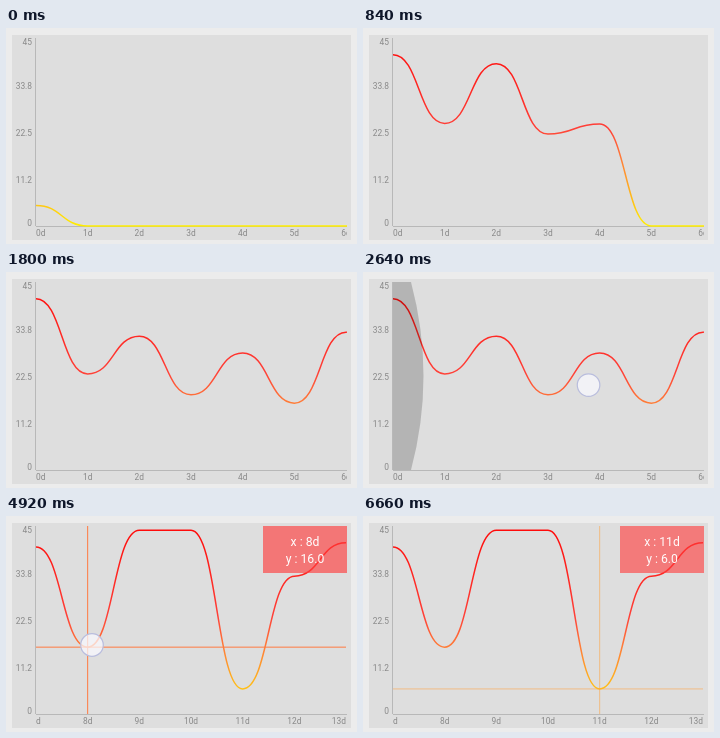
Animation of 351 by 216 pixels, one loop 6.72 s. Source, as an HTML page with a canvas:

```html
<!DOCTYPE html>
<html lang="en">
<head>
<meta charset="utf-8">
<title>Line chart</title>
<style>
  html, body { margin: 0; width: 100%; height: 100%; overflow: hidden; background: #ececec; }
  canvas { display: block; width: 351px; height: 216px; }
</style>
</head>
<body>
<canvas id="chart"></canvas>
<script>
const W = 351, H = 216, LOOP = 6720, STEP = 60;
const L = 30, R = 340, T = 10, B = 198;
const DAY = (R - L) / 6;
const values = [41, 23, 32, 18, 28, 16, 33, 40, 16, 44, 44, 6, 33, 41];
const LAST = values.length - 1;
const END = (LAST - 6) * DAY;

const canvas = document.getElementById('chart');
const ctx = canvas.getContext('2d');
const dpr = window.devicePixelRatio || 1;
canvas.width = W * dpr;
canvas.height = H * dpr;

const heat = ctx.createLinearGradient(0, T, 0, B);
[[0, '#ff0808'], [0.48, '#ff4038'], [0.65, '#ff7f38'], [0.86, '#ffbe18'], [1, '#ffee00']]
  .forEach(([at, color]) => heat.addColorStop(at, color));

const clamp = v => Math.min(1, Math.max(0, v));
const ramp = (t, a, b) => clamp((t - a) / (b - a));
const mix = (a, b, k) => a + (b - a) * k;
const smooth = k => k * k * (3 - 2 * k);
const yOf = v => B - v * (B - T) / 45;

// Overshoot easing with tension 3
function overshoot(p) {
  const s = clamp(p) - 1;
  return 4 * s * s * s + 3 * s * s + 1;
}

function valueAt(i, t) {
  return t >= 1800 ? values[i] : values[i] * overshoot((t + 17 - i * 173) / 825);
}

function scrollAt(t) {
  const k = ramp(t, 3080, 3410);
  return END * smooth(k);
}

function clipped(x, y, w, h, draw) {
  ctx.save();
  ctx.beginPath();
  ctx.rect(x, y, w, h);
  ctx.clip();
  draw();
  ctx.restore();
}

function segment(x0, y0, x1, y1) {
  ctx.beginPath();
  ctx.moveTo(x0, y0);
  ctx.lineTo(x1, y1);
  ctx.stroke();
}

function text(str, x, y, align) {
  ctx.textAlign = align;
  ctx.fillText(str, x, y);
}

function drawFrame() {
  ctx.fillStyle = '#ececec';
  ctx.fillRect(0, 0, W, H);
  ctx.fillStyle = '#dedede';
  ctx.fillRect(6, 7, 339, 205);
  ctx.strokeStyle = '#b8b8b8';
  ctx.lineWidth = 1;
  segment(L - 0.5, T, L - 0.5, B);
  segment(L, B + 0.5, R + 1, B + 0.5);
}

function drawLabels(scroll) {
  ctx.font = '8.4px Roboto, sans-serif';
  ctx.fillStyle = '#888';
  ['45', '33.8', '22.5', '11.2', '0'].forEach((s, i) =>
    text(s, 26, [17, 61, 108, 154.5, 198][i], 'right'));
  clipped(L, B, R - L + 1, 14, () => {
    for (let i = 0; i <= LAST; i++) {
      const align = i === 0 ? 'left' : i === LAST ? 'right' : 'center';
      text(i + 'd', L + i * DAY - scroll, 208, align);
    }
  });
}

function drawCurve(t, scroll) {
  clipped(L, T - 1, R - L + 1, B - T + 2, () => {
    ctx.beginPath();
    let px = L - scroll, py = yOf(valueAt(0, t));
    ctx.moveTo(px, py);
    for (let i = 1; i <= LAST; i++) {
      const x = L + i * DAY - scroll, y = yOf(valueAt(i, t)), mid = (px + x) / 2;
      ctx.bezierCurveTo(mid, py, mid, y, x, y);
      px = x;
      py = y;
    }
    ctx.strokeStyle = heat;
    ctx.lineWidth = 1.5;
    ctx.stroke();
  });
}

// Overscroll bulge; dir is 1 on the left edge, -1 on the right
function drawGlow(edge, dir, size, alpha) {
  if (size <= 0 || alpha <= 0) return;
  ctx.fillStyle = `rgba(0,0,0,${0.19 * alpha})`;
  ctx.beginPath();
  ctx.moveTo(edge, T);
  ctx.lineTo(edge + dir * 18 * size, T);
  ctx.quadraticCurveTo(edge + dir * 43 * size, (T + B) / 2, edge + dir * 18 * size, B);
  ctx.lineTo(edge, B);
  ctx.fill();
}

function drawTouch(x, y, alpha) {
  if (alpha <= 0) return;
  ctx.globalAlpha = alpha;
  ctx.beginPath();
  ctx.arc(x, y, 11.3, 0, 7);
  ctx.fillStyle = 'rgba(250,250,255,.72)';
  ctx.fill();
  ctx.strokeStyle = '#b9bddd';
  ctx.lineWidth = 1.2;
  ctx.stroke();
  ctx.globalAlpha = 1;
}

function drawTap(age, day, color, tx, ty) {
  if (age < 0 || age >= 780) return;
  const x = L + day * DAY - END, y = yOf(values[day]);
  ctx.globalAlpha = 1 - ramp(age, 240, 780);
  ctx.strokeStyle = color;
  ctx.lineWidth = 1;
  segment(x, T, x, B);
  segment(L, y, R, y);

  ctx.globalAlpha = 1 - ramp(age, 470, 780);
  ctx.fillStyle = 'rgba(255,64,64,.65)';
  ctx.fillRect(257, T, 84, 47);
  ctx.fillStyle = '#fff';
  ctx.font = '12.2px Roboto, sans-serif';
  text(`x : ${day}d`, 299, 30, 'center');
  text(`y : ${values[day].toFixed(1)}`, 299, 46.5, 'center');
  ctx.globalAlpha = 1;
  drawTouch(tx, ty, 1 - ramp(age, 120, 360));
}

function drawGestures(t) {
  const pull = smooth(ramp(t, 2340, 2700));
  drawGlow(L, 1, ramp(t, 2340, 2620), 1 - ramp(t, 2700, 3000));
  drawTouch(mix(120, 234, pull), mix(108, 113.5, pull),
    ramp(t, 2280, 2400) * (1 - ramp(t, 2700, 2900)));

  const swipe = smooth(ramp(t, 3060, 3360));
  drawTouch(mix(288, 142, swipe), mix(122, 156, swipe),
    ramp(t, 3000, 3100) * (1 - ramp(t, 3300, 3480)));
  drawGlow(R + 1, -1, 0.7 * ramp(t, 3400, 3560), 1 - ramp(t, 3600, 4080));

  drawTap(t - 4920, 8, '#ff7a40', 86, 129);
  drawTap(t - 6180, 11, '#ffa03c', 240, 172);
}

function render(now) {
  const t = Math.floor((now % LOOP) / STEP) * STEP;
  const scroll = scrollAt(t);
  ctx.setTransform(dpr, 0, 0, dpr, 0, 0);
  drawFrame();
  drawLabels(scroll);
  drawCurve(t, scroll);
  drawGestures(t);
}

const start = performance.now();
function tick() {
  render(performance.now() - start);
  requestAnimationFrame(tick);
}
tick();
</script>
</body>
</html>
```
